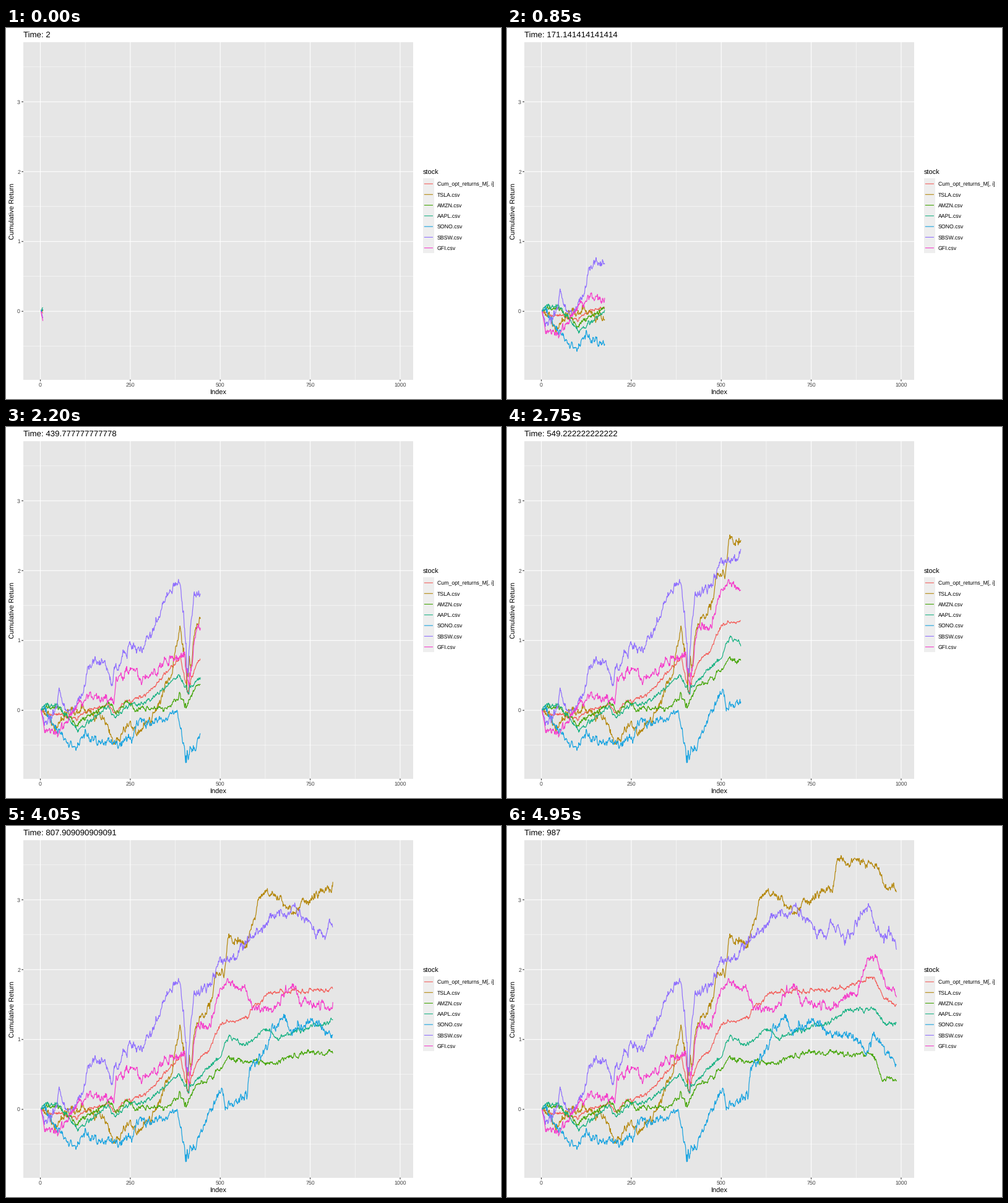
A matplotlib script that plays this animation: 800x600 px, repeating every 5 s.

```python
import numpy as np
import matplotlib.pyplot as plt
from matplotlib.animation import FuncAnimation
from matplotlib.patches import Rectangle

plt.rcParams["font.family"] = "Liberation Sans"
plt.rcParams["text.hinting"] = "none"

W, H, DPI = 800, 600, 100
PT = 72 / DPI  # points per pixel
FRAMES, INTERVAL = 100, 50
FIRST, LAST, LEAD = 2, 987, 5
LEFT, RIGHT, TOP, BOTTOM = 28, 658, 23, 568.6
PANEL, KEY, TICK, LABEL = "#E6E6E6", "#EEEEEE", "#333333", "#444444"

DAYS = np.arange(FIRST, LAST + 1)
CRASH = 410  # day of the shock shared by all stocks

# Name, colour, daily volatility and turning points (day, cumulative return).
STOCKS = [
    ("Cum_opt_returns_M[, i]", "#F35E5A", .012, [
        (2, 0), (99, -.12), (128, 0), (188, .09), (206, -.07), (226, .11),
        (295, .22), (389, .76), (410, .27), (436, .71), (467, .85),
        (501, 1.24), (575, 1.32), (592, 1.47), (641, 1.67), (785, 1.71),
        (868, 1.78), (924, 1.89), (955, 1.56), (987, 1.5)]),
    ("TSLA.csv", "#B4870B", .025, [
        (2, 0), (49, -.22), (77, 0), (132, 0), (185, -.16), (209, -.5),
        (240, -.2), (269, -.32), (307, -.17), (360, .47), (389, 1.22),
        (410, .35), (432, 1.2), (475, 1.53), (489, 1.97), (510, 1.92),
        (522, 2.4), (575, 2.37), (615, 3.12), (634, 3.14), (699, 2.86),
        (809, 3.19), (821, 3.56), (924, 3.5), (959, 3.18), (987, 3.19)]),
    ("AMZN.csv", "#45A608", .014, [
        (2, 0), (42, .07), (99, -.2), (150, -.04), (197, .11), (211, -.03),
        (240, .14), (262, .01), (362, .05), (389, .23), (405, .02),
        (431, .36), (467, .41), (524, .73), (579, .68), (656, .66),
        (743, .83), (868, .79), (923, .79), (948, .42), (987, .44)]),
    ("AAPL.csv", "#18B283", .013, [
        (2, 0), (20, .09), (46, .1), (106, -.3), (175, 0), (188, .05),
        (206, -.12), (240, .03), (309, .16), (384, .51), (410, .24),
        (444, .49), (501, .76), (525, 1.06), (568, .92), (625, 1.15),
        (661, 1.03), (794, 1.24), (850, 1.42), (924, 1.43), (955, 1.23),
        (987, 1.23)]),
    ("SONO.csv", "#18A3E0", .025, [
        (2, 0), (16, .02), (39, -.25), (99, -.55), (126, -.35), (163, -.5),
        (254, -.43), (271, -.12), (326, -.14), (378, -.02), (410, -.68),
        (444, -.38), (469, -.02), (505, .25), (513, .06), (575, .2),
        (582, .6), (630, .87), (645, 1.2), (680, 1.31), (700, 1.12),
        (771, 1.29), (805, 1.08), (881, 1), (909, .77), (919, 1.06),
        (987, .64)]),
    ("SBSW.csv", "#9070FE", .028, [
        (2, 0), (11, -.16), (46, .03), (52, .27), (73, -.05), (120, .18),
        (132, .62), (171, .73), (200, .42), (209, .63), (254, .92),
        (283, .83), (343, 1.53), (389, 1.86), (410, .75), (427, 1.65),
        (477, 1.8), (499, 2.16), (545, 2.2), (573, 2.4), (618, 2.57),
        (647, 2.8), (711, 2.86), (795, 2.44), (804, 2.6), (854, 2.44),
        (904, 2.94), (952, 2.42), (966, 2.55), (987, 2.32)]),
    ("GFI.csv", "#F53ECB", .026, [
        (2, 0), (11, -.3), (42, -.33), (102, .03), (138, .2), (204, .13),
        (211, .45), (269, .62), (283, .43), (340, .68), (400, .82),
        (410, .35), (436, 1.2), (472, 1.23), (503, 1.77), (532, 1.8),
        (570, 1.7), (589, 1.45), (649, 1.46), (706, 1.78), (723, 1.57),
        (795, 1.45), (881, 1.7), (907, 2.17), (931, 2.17), (962, 1.73),
        (987, 1.68)])]

fig = plt.figure(figsize=(W / DPI, H / DPI), dpi=DPI, facecolor="white")
ax = fig.add_axes([0, 0, 1, 1])
ax.set(xlim=(0, W), ylim=(H, 0))
ax.axis("off")


def px(index):
    return 55.5 + .5815 * index


def py(value):
    return 458.2 - 112.95 * value


def line(xs, ys, color, width):
    return ax.plot(xs, ys, color=color, lw=width * PT, snap=False,
                   solid_capstyle="butt", solid_joinstyle="round")[0]


def box(x, y, w, h, color):
    ax.add_patch(Rectangle((x, y), w, h, fc=color, lw=0))


def label(x, y, text, size, color="black", **kw):
    return ax.text(x, y, text, fontsize=size * PT, color=color, **kw)


def prices(turns, vol, rng):
    """Trend through the turning points plus mean-reverting daily jitter."""
    trend = np.interp(DAYS, *np.transpose(turns))
    memory = .75 ** np.arange(30)
    jitter = np.convolve(rng.normal(size=len(DAYS)), memory)[:len(DAYS)]
    shock = 1 + 2 * np.exp(-((DAYS - CRASH) / 9) ** 2)
    return trend + vol * shock * jitter


def draw_grid():
    box(LEFT, TOP, RIGHT - LEFT, BOTTOM - TOP, PANEL)
    for minor in (True, False):
        width = .55 if minor else 1.1
        for i in range(9):
            if (i % 2 == 1) == minor:
                x, y = px(125 * i), py((i - 1) / 2)
                line([x, x], [TOP, BOTTOM], "white", width)
            else:
                y = py((i - 1) / 2)
                line([LEFT, RIGHT], [y, y], "white", width)


def draw_axes():
    for v in range(4):
        y = py(v)
        line([LEFT - 2.75, LEFT], [y, y], TICK, 1.1)
        label(23, y + 3.2, str(v), 8.8, LABEL, ha="right")
    for v in range(0, 1001, 250):
        x = px(v)
        line([x, x], [BOTTOM, BOTTOM + 2.75], TICK, 1.1)
        label(x, 580, str(v), 8.8, LABEL, ha="center")
    label(343, 593, "Index", 11, ha="center")
    label(13.5, 296, "Cumulative Return", 11, ha="center",
          rotation=90, rotation_mode="anchor")


def draw_legend():
    label(674, 237, "stock", 11)
    box(674, 243.2, 17.6, 121, KEY)
    for i, (name, color, _, _) in enumerate(STOCKS):
        y = 252 + 17.28 * i
        line([675.8, 690], [y, y], color, 1.1)
        label(697, y + 3.2, name, 8.8)


draw_grid()
draw_axes()
draw_legend()
title = label(28, 15, "", 13.2)

rng = np.random.default_rng(7)
curves = [(line([], [], color, 1.2), prices(turns, vol, rng))
          for _, color, vol, turns in STOCKS]


def update(frame):
    time = FIRST + (LAST - FIRST) * frame / (FRAMES - 1)
    end = min(time + LEAD, LAST)
    title.set_text(f"Time: {time:.15g}")
    xs = np.append(DAYS[DAYS < end], end)
    for curve, values in curves:
        curve.set_data(px(xs), py(np.interp(xs, DAYS, values)))
    return [title] + [curve for curve, _ in curves]


anim = FuncAnimation(fig, update, frames=FRAMES, interval=INTERVAL,
                     init_func=lambda: update(0), repeat=True, repeat_delay=0)
plt.show()
```
